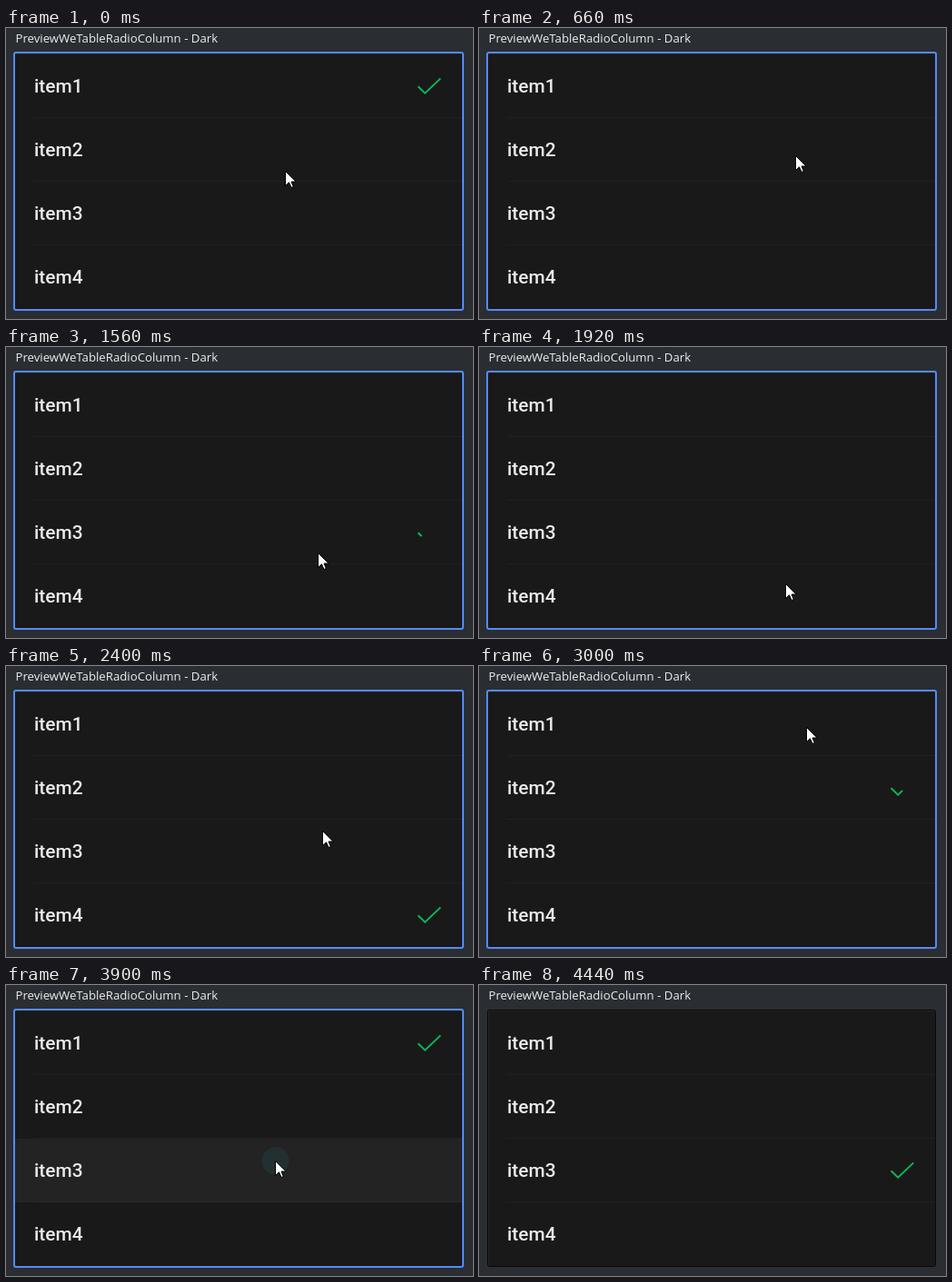
An HTML page with a canvas that plays this animation: 514 by 320 pixels, repeating every 5.34 s.

```html
<!DOCTYPE html>
<html>
<head>
<meta charset="utf-8">
<style>
html, body { margin: 0; width: 100%; height: 100%; overflow: hidden; background: #2a2d31; }
canvas { display: block; }
</style>
</head>
<body>
<canvas id="stage" width="514" height="320"></canvas>
<script>
const ctx = document.getElementById('stage').getContext('2d');
const LOOP = 5340, STEP = 60, ROW = 70, TOP = 29, HOLD = 180;

// pointer stops; a tap selects the row under it when the pointer leaves
// ripple: 0 none, 1 circle, 2 circle and row highlight
const stop = (arrive, leave, x, y, ripple = 0) => ({ arrive, leave, x, y, ripple, row: Math.floor((y - TOP) / ROW) });
const wander = [stop(0, 0, 307, 157), stop(180, 300, 347, 115), stop(420, 600, 342, 128)];
const taps = [
  stop(660, 660, 348, 140),
  stop(1200, 1380, 347, 203, 1),
  stop(1800, 1860, 337, 262),
  stop(2580, 2760, 350, 166, 1),
  stop(3000, 3360, 360, 67, 1),
  stop(3780, 4080, 296, 193, 2)
];
const exit = stop(4380, 4380, 230, 312);
const stops = [...wander, ...taps, exit];

const clamp = v => Math.max(0, Math.min(1, v));
const smooth = v => v * v * (3 - 2 * v);

function trace(points, dx, dy) {
  ctx.beginPath();
  points.forEach(([x, y]) => ctx.lineTo(x + dx, y + dy));
}

function drawRipple(t, tap) {
  const age = t - tap.leave + HOLD;
  if (!tap.ripple || age < 0 || age > 300) return;
  const out = clamp((age - 120) / 180);
  const top = TOP + ROW * tap.row;
  ctx.save();
  ctx.beginPath();
  ctx.rect(10, top, 492, ROW);
  ctx.clip();
  ctx.globalAlpha = 1 - out;
  if (tap.ripple > 1) {
    ctx.fillStyle = 'rgba(235,255,235,.043)';
    ctx.fillRect(10, top, 492, ROW);
  }
  ctx.fillStyle = tap.ripple > 1 ? 'rgba(34,110,125,.17)' : 'rgba(32,120,98,.11)';
  ctx.beginPath();
  ctx.arc(tap.x + .5, tap.y + .5, 15 + 8 * age / STEP + 360 * out, 0, 7);
  ctx.fill();
  ctx.restore();
}

function drawCheck(t) {
  const { leave, row } = taps.filter(p => p.leave <= t).pop() || { leave: -LOOP, row: 0 };
  const part = smooth(clamp((t - leave - 120) / 240));
  if (!part) return;
  ctx.setLineDash([35 * part, 99]);
  ctx.strokeStyle = '#0ab75d';
  ctx.lineWidth = 2;
  trace([[453.5, 64.2], [461.2, 71.7], [478.3, 55.4]], 0, ROW * row);
  ctx.stroke();
  ctx.setLineDash([]);
}

function drawPointer(t) {
  if (t > exit.arrive) return;
  const i = stops.findIndex(s => s.leave >= t);
  const to = stops[i], from = stops[i - 1] || to;
  const k = to === from ? 1 : smooth(clamp((t - from.leave) / (to.arrive - from.leave)));
  const mix = key => Math.round(from[key] + (to[key] - from[key]) * k);
  trace([[.5, .5], [.5, 16.5], [4.5, 12.8], [7, 18.5], [9.3, 17.5], [7, 12], [12.2, 12]], mix('x'), mix('y'));
  ctx.closePath();
  ctx.fillStyle = '#fff';
  ctx.fill();
  ctx.strokeStyle = '#000';
  ctx.lineWidth = 1;
  ctx.stroke();
}

function drawPanel(hover) {
  const inset = hover ? 9 : 9.5;
  ctx.beginPath();
  ctx.roundRect(inset, inset + 18, 512 - 2 * inset, 301 - 2 * inset, 2);
  ctx.fillStyle = '#191919';
  ctx.fill();
  ctx.fillStyle = '#222427';
  ctx.fillRect(10, 28, 492, 1);
  if (!hover) ctx.fillRect(10, 28, 1, 281);
  ctx.strokeStyle = hover ? '#548af7' : '#0a0a0b';
  ctx.lineWidth = hover ? 2 : 1;
  ctx.stroke();
}

function draw(t) {
  ctx.fillStyle = '#2a2d31';
  ctx.fillRect(0, 0, 514, 320);
  ctx.fillStyle = '#eceef1';
  ctx.font = '13.2px "Open Sans", sans-serif';
  ctx.fillText('PreviewWeTableRadioColumn - Dark', 10.5, 16);
  drawPanel(t < exit.arrive);

  ctx.fillStyle = '#212121';
  for (let i = 1; i < 4; i++) ctx.fillRect(31, TOP - 1 + ROW * i, 471, 1);
  taps.forEach(tap => drawRipple(t, tap));

  ctx.fillStyle = '#ebebeb';
  ctx.font = '500 20.9px Roboto, sans-serif';
  for (let i = 0; i < 4; i++) ctx.fillText('item' + (i + 1), 31, 71.4 + ROW * i);
  drawCheck(t);
  drawPointer(t);
}

const begin = performance.now();
function tick() {
  const t = (performance.now() - begin) % LOOP;
  draw(Math.floor(t / STEP) * STEP);
  requestAnimationFrame(tick);
}
tick();
</script>
</body>
</html>
```
